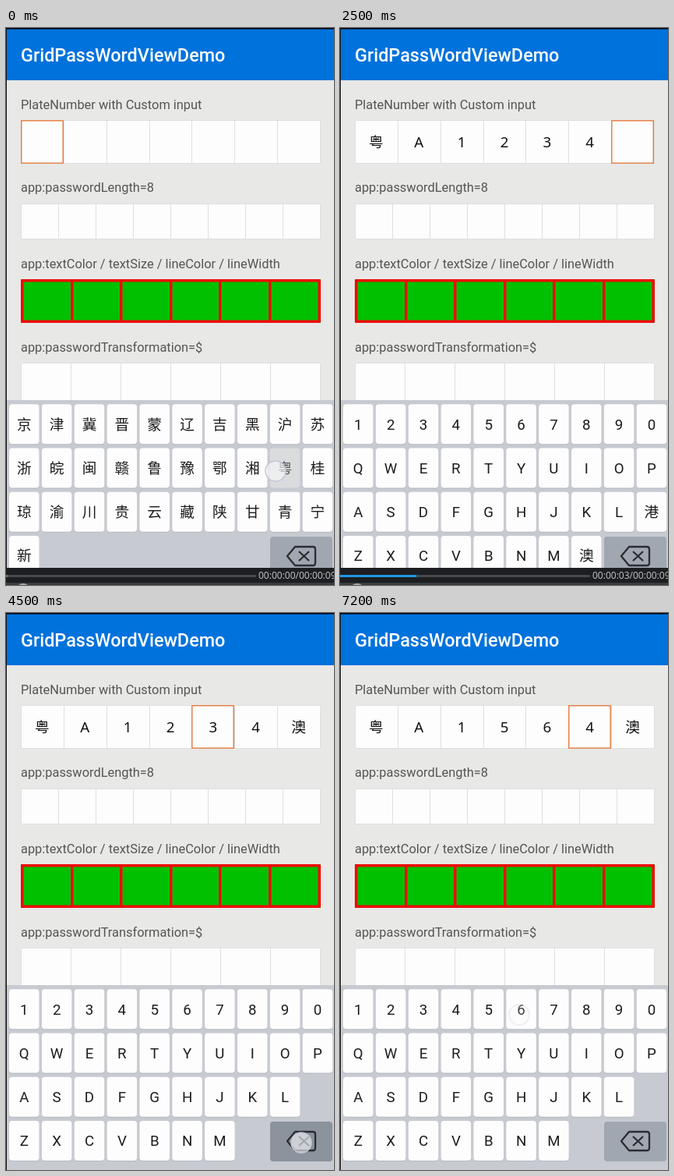
These frames come from a looping animation (421x714 px, 7.3 s). An HTML page with a canvas:

```html
<!DOCTYPE html>
<html lang="en">
<head>
<meta charset="utf-8">
<title>Grid password demo</title>
<style>
  html, body { margin: 0; width: 421px; height: 714px; overflow: hidden; }
  canvas { display: block; }
</style>
</head>
<body>
<canvas id="stage" width="421" height="714"></canvas>
<script>
const ctx = document.getElementById('stage').getContext('2d');
const LOOP = 7300;
const SANS = 'Roboto, "Noto Sans CJK SC", "Noto Sans CJK JP", sans-serif';
const CELL_FONT = '"Noto Sans", "Noto Sans CJK SC", "Noto Sans CJK JP", sans-serif';

const LETTERS = ['QWERTYUIOP', 'ASDFGHJKL', 'ZXCVBNM'];
const BOARDS = {
  province: ['京津冀晋蒙辽吉黑沪苏', '浙皖闽赣鲁豫鄂湘粤桂', '琼渝川贵云藏陕甘青宁', '新'],
  letters: ['', ...LETTERS],
  full: ['1234567890', ...LETTERS],
  last: ['1234567890', 'QWERTYUIOP', 'ASDFGHJKL港', 'ZXCVBNM澳'],
};

const UP = { press: null, touch: null, popup: false };
const down = (key, x, y, popup = true) => ({ press: key, touch: [x, y], popup });
// focus: index of the plate cell, -1 for none, 'type' for the first password-type cell
const EVENTS = [
  [0, { plate: '', focus: 0, board: 'province', seconds: 0, ...down('粤', 346, 568, false) }],
  [100, { plate: '粤', focus: 1, board: 'letters', seconds: 1, ...UP }],
  [400, down('A', 29, 623)],
  [700, { plate: '粤A', focus: 2, board: 'full', ...UP }],
  [1000, { seconds: 2, ...down('1', 24, 509) }],
  [1200, { plate: '粤A1', focus: 3, ...UP }],
  [1400, down('2', 68, 508)],
  [1600, { plate: '粤A12', focus: 4, ...UP }],
  [1700, down('3', 108, 509)],
  [1900, { plate: '粤A123', focus: 5, ...UP }],
  [2100, { seconds: 3, ...down('4', 150, 509) }],
  [2400, { plate: '粤A1234', focus: 6, board: 'last', ...UP }],
  [2600, down('澳', 317, 678)],
  [2700, { seconds: -1 }],
  [2800, { plate: '粤A1234澳', ...UP }],
  [2900, { focus: -1, board: null }],
  [3400, { focus: 'type' }],
  [3600, down(null, 253, 145, false)],
  [3800, { focus: 4, ...UP }],
  [3900, { board: 'full' }],
  [4400, down('⌫', 379, 679, false)],
  [4600, { plate: '粤A12 4澳' }],
  [4800, UP],
  [5000, down('⌫', 379, 679, false)],
  [5200, { plate: '粤A1  4澳', focus: 3 }],
  [5300, UP],
  [6600, down('5', 191, 510)],
  [6700, { plate: '粤A15 4澳', focus: 4 }],
  [6800, UP],
  [6900, down('6', 230, 513)],
  [7100, { plate: '粤A1564澳', focus: 5, ...UP, touch: [230, 515], fade: 0.3 }],
];

const stateAt = t => Object.assign({ fade: 1 }, ...EVENTS.filter(e => e[0] <= t).map(e => e[1]));

function rect(x, y, w, h, fill) {
  ctx.fillStyle = fill;
  ctx.fillRect(x, y, w, h);
}

function round(x, y, w, h, r, fill) {
  ctx.fillStyle = fill;
  ctx.beginPath();
  ctx.roundRect(x, y, w, h, r);
  ctx.fill();
}

function disc(x, y, r, fill) {
  ctx.fillStyle = fill;
  ctx.beginPath();
  ctx.arc(x, y, r, 0, 7);
  ctx.fill();
}

function text(s, x, y, size, fill, { align = 'left', font = SANS, weight = 400 } = {}) {
  ctx.font = `${weight} ${size}px ${font}`;
  ctx.textAlign = align;
  ctx.fillStyle = fill;
  ctx.fillText(s, x, y);
}

function frame(x, y, w, h, color, line) {
  ctx.strokeStyle = color;
  ctx.lineWidth = line;
  ctx.strokeRect(x + line / 2, y + line / 2, w - line, h - line);
}

function grid(y, h, count, { fill = '#fdfdfd', color = '#dddfe0', line = 1, focus = -1, chars = '' } = {}) {
  const step = (385 - line) / count;
  const left = i => Math.round(19 + i * step);
  rect(19, y, 385, h, fill);
  frame(19, y, 385, h, color, line);
  for (let i = 1; i < count; i++) rect(left(i), y, line, h, color);
  [...chars].forEach((c, i) =>
    text(c, 19 + (i + 0.5) * step, y + 35, 18.7, '#111', { align: 'center', font: CELL_FONT }));
  if (focus >= 0) frame(left(focus), y, left(focus + 1) - left(focus), h, '#e6824a', 1.5);
}

function page(s) {
  rect(0, 0, 421, 714, '#e8e8e7');
  rect(0, 0, 421, 67, '#0072dc');
  text('GridPassWordViewDemo', 19, 43, 23.4, '#fff', { weight: 500 });
  const label = (str, y) => text(str, 19, y, 16.4, '#555');
  label('PlateNumber with Custom input', 104);
  label('app:passwordLength=8', 210);
  label('app:textColor / textSize / lineColor / lineWidth', 308);
  label('app:passwordTransformation=$', 414.5);
  label('app:passwordType=', 526);
  label('Test OnPasswordChangedListener with twice input', 619);
  text('numberPassword', 176.5, 526, 18.7, '#0f73cf');

  grid(118, 56, 7, { focus: s.focus, chars: s.plate });
  grid(225, 46, 8);
  grid(322, 56, 6, { fill: '#00c000', color: '#f00a0a', line: 3.5 });
  grid(429, 56, 6);
  grid(545, 56, 6, { focus: s.focus === 'type' ? 0 : -1 });
  grid(633, 56, 6);

  round(355, 512, 38, 16, 8, '#989898');
  disc(365, 521.5, 11.5, '#d2d2d2');
  disc(365, 520.5, 11, '#ececec');

  rect(0, 0, 421, 1.5, '#000');
  rect(0, 0, 1, 714, '#111');
}

function backspace(pressed) {
  round(339, 652, 80, 51, 4, pressed ? '#8b939d' : '#a0a7b1');
  ctx.strokeStyle = '#2b2d30';
  ctx.lineWidth = 2.3;
  ctx.lineJoin = 'round';
  ctx.stroke(new Path2D('M361 677 L371 665 H394 Q397 665 397 668 V686 Q397 689 394 689 H371 Z M376 671 L389 683 M389 671 L376 683'));
}

function keyboard(s) {
  if (!s.board) return;
  const rows = BOARDS[s.board];
  const top = rows[0] ? 477 : 533;
  rect(1, top, 420, 714 - top, '#c7cad1');
  let preview = null;
  rows.forEach((row, r) => [...row].forEach((c, i) => {
    const x = 4 + i * 41.85, y = 482.3 + r * 56.2;
    const pressed = c === s.press;
    if (!pressed) round(x, y + 1, 38.6, 51, 4, '#b4b8c0');
    round(x, y, 38.6, 51, 4, pressed ? '#dadbdd' : '#fdfdfd');
    text(c, x + 19.3, y + 32.3, 18.7, pressed ? '#555' : '#1c1c1c', { align: 'center' });
    if (pressed && s.popup) preview = [c, x, y - 106.5];
  }));
  backspace(s.press === '⌫');
  if (preview) {
    const [c, x, y] = preview;
    round(x, y, 116.5, 51.5, 4, '#fdfdfd');
    text(c, x + 58.3, y + 38, 31.5, '#1c1c1c', { align: 'center' });
  }
}

function touch(s) {
  if (!s.touch) return;
  const [x, y] = s.touch;
  ctx.globalAlpha = s.fade;
  disc(x, y, 13, 'rgba(250,250,252,.6)');
  ctx.strokeStyle = '#c3c5d6';
  ctx.lineWidth = 1.5;
  ctx.stroke();
  ctx.globalAlpha = 1;
}

function player(seconds) {
  if (seconds < 0) return;
  rect(0, 692, 421, 22, '#1c1e21');
  rect(0, 701, 321, 3, '#46484b');
  rect(0, 701, Math.max(2, seconds * 32.7), 3, seconds ? '#2196e3' : '#777');
  text(`00:00:0${seconds}/00:00:09`, 324, 706, 12, '#c4c6c8', { font: '"Open Sans", sans-serif' });
  rect(0, 711, 421, 3, '#393c40');
  disc(22, 722, 10, '#a9abad');
}

function draw(now) {
  const s = stateAt(now % LOOP);
  page(s);
  keyboard(s);
  touch(s);
  player(s.seconds);
}

const start = performance.now();
function tick() {
  draw(performance.now() - start);
  requestAnimationFrame(tick);
}
tick();
</script>
</body>
</html>
```
